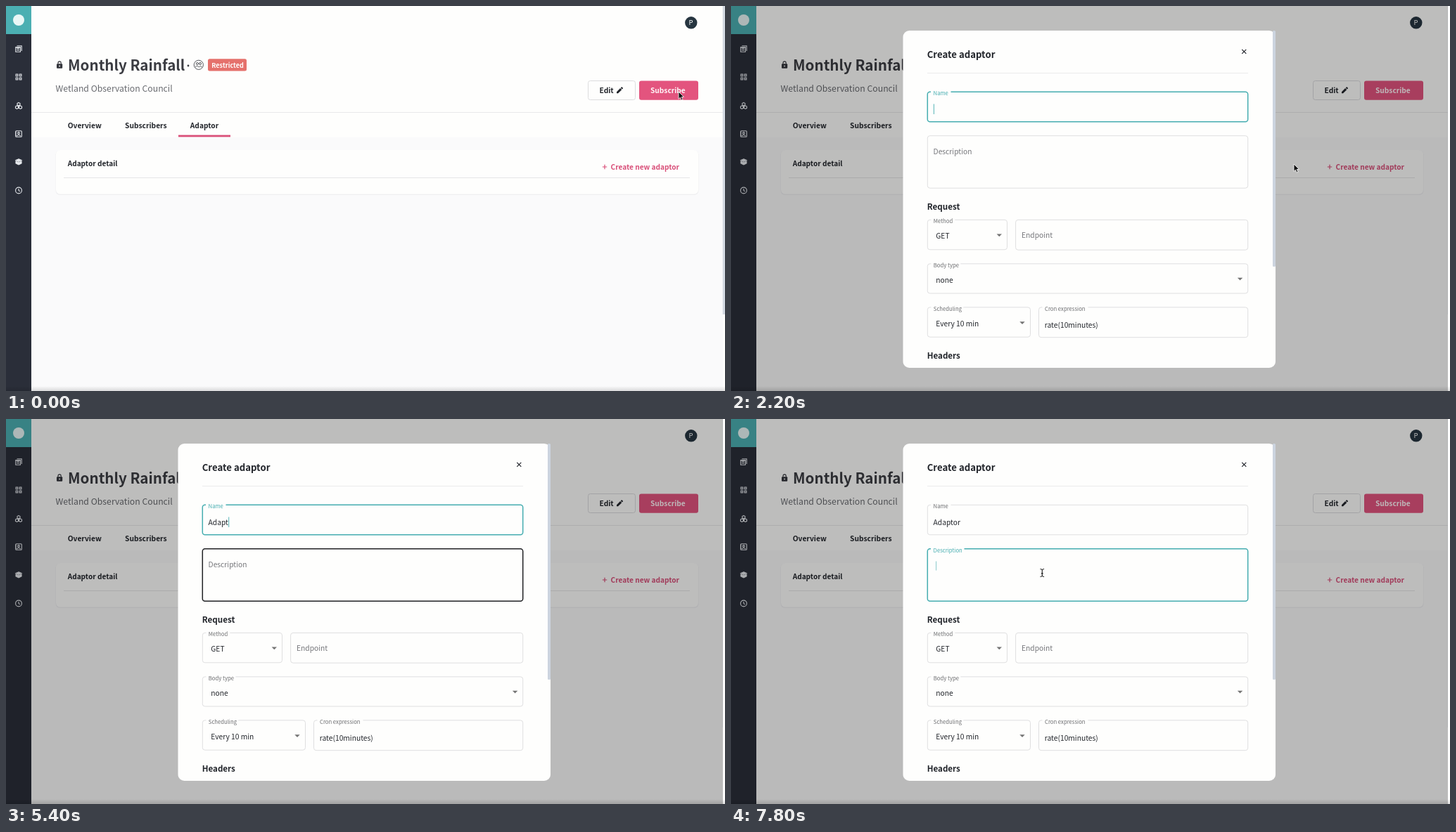
Recreate the animation shown at these times as an HTML page. Size 1022 by 548 pixels, loop 8 s.

```html
<!DOCTYPE html>
<html lang="en">
<head>
<meta charset="utf-8">
<title>Create adaptor</title>
<style>
  html, body { margin: 0; width: 100%; height: 100%; overflow: hidden; background: #fefefd; }
  svg { display: block; width: 1022px; height: 548px; }
  text { font-family: "Noto Sans CJK SC", "Noto Sans CJK JP", "Noto Sans CJK", "Noto Sans", sans-serif; white-space: pre; }
  .bold { font-weight: 700; }
</style>
</head>
<body>
<svg id="stage" viewBox="0 0 1022 548" xmlns="http://www.w3.org/2000/svg"></svg>
<script>
const LOOP = 8000, STEP = 200;
const INK = '#22252b', GREY = '#75767a', LINE = '#dfdfe0', TEAL = '#45adb0', PINK = '#d94f79';
const LABEL = 7.7, BODY = 10.25;

const text = (x, y, size, str, fill = INK, cls = '', id = '') =>
  `<text x="${x}" y="${y}" font-size="${size}" fill="${fill}" class="${cls}" id="${id}">${str}</text>`;
const bold = (x, y, size, str, fill = INK) => text(x, y, size, str, fill, 'bold');
const rect = (x, y, w, h, fill, extra = '') =>
  `<rect x="${x}" y="${y}" width="${w}" height="${h}" fill="${fill}" ${extra}/>`;
const path = (d, fill = 'none', stroke = 'none', width = 1, extra = '') =>
  `<path d="${d}" fill="${fill}" stroke="${stroke}" stroke-width="${width}" ${extra}/>`;
const group = (id, body) => `<g id="${id}">${body}</g>`;

const box = (x, y, right, bottom, id = '') =>
  rect(x, y, right - x, bottom - y, 'none', `rx="3.5" stroke="${LINE}" id="${id}"`);
const notch = (x, y, w, id = '') => rect(x, y - 2, w, 4, '#fefefd', `id="${id}"`);
const field = (x, y, right, bottom, label, labelWidth, value, baseline, inset) =>
  box(x, y, right, bottom) + notch(x + 5, y, labelWidth) +
  text(x + 8.5, y + 5, LABEL, label, '#6c6d70') + text(x + inset, baseline, BODY, value);
const caretDown = (x, y) => path(`M${x - 3.7} ${y - 1.8}h7.4l-3.7 3.7z`, '#747474');

function sidebar() {
  const icon = (y, body) => `<g transform="translate(18 ${y})" fill="none" stroke="#e6e9ed" stroke-width="1.1">${body}</g>`;
  const square = (x, y) => `<rect x="${x}" y="${y}" width="2.7" height="2.7"/>`;
  return rect(0, 0, 36, 548, '#2a2e39') + rect(0, 0, 36, 40, '#4bafb2') +
    '<circle cx="18" cy="20" r="8" fill="#e9f7f6"/>' +
    icon(61, '<path d="M-4.2-2.5h6.6v6.7h-6.6zM-2.5-4.2H4.2V3M-2.6-.6H.8M-2.6 1.6H.8M-4-2H2"/>') +
    icon(101, square(-3.9, -3.9) + square(1.2, -3.9) + square(-3.9, 1.2) + square(1.2, 1.2)) +
    icon(142, '<path d="M0-4.5l2 1.1v2.2L0 0l-2-1.2v-2.2zM-2.5 0l2 1.1v2.2l-2 1.1-2-1.1V1.1zM2.5 0l2 1.1v2.2l-2 1.1-2-1.1V1.1z"/>') +
    icon(182, '<rect x="-4.3" y="-4.2" width="8.6" height="8.4" rx="1"/><circle cy="-1.1" r="1.3"/><path d="M-2.7 3.2Q0-.2 2.7 3.2M-4.3-2.2h1.2M-4.3 0h1.2M-4.3 2.2h1.2"/>') +
    icon(222, '<path d="M0-4.2l4 1.8-4 1.8-4-1.8z" fill="#e6e9ed"/><path d="M-4-1v3L0 4l4-2v-3L0 1z" fill="#e6e9ed"/>') +
    icon(262.5, '<circle r="4.4"/><path d="M0-2.6V.2l2 1.2"/>');
}

function page() {
  return rect(0, 0, 1022, 548, '#fefefd') + rect(36, 187, 983, 361, '#fafafb') +
    sidebar() +
    '<circle cx="973.8" cy="23.8" r="8.7" fill="#263540"/>' + text(970.6, 27.4, 9.5, 'P', '#fff') +
    rect(72, 82.3, 8.2, 6.4, '#34363c', 'rx="1"') + path('M74 83v-2a2.1 2.1 0 0 1 4.2 0v2', 'none', '#34363c', 1.1) +
    '<circle cx="76.1" cy="85.5" r=".9" fill="#fff"/>' +
    bold(88, 91.6, 20.6, 'Monthly Rainfall', '#3b3c42') +
    '<circle cx="259" cy="85" r="1.4" fill="#3b3c42"/>' +
    `<g fill="none" stroke="#55575c"><circle cx="273.8" cy="83.8" r="6.6"/><circle cx="271.8" cy="82" r="1.5"/>
     <circle cx="276" cy="82" r="1.5"/><path d="M269 87q2.8-3.4 5.2 0q2-3 4.6 0"/></g>` +
    rect(287, 75.3, 55, 17.3, '#e5716c', 'rx="2.5"') + bold(292.3, 87.8, 9.05, 'Restricted', '#fff') +
    text(70.5, 121.7, 12.25, 'Wetland Observation Council', '#686a6f') +
    rect(827.5, 106.5, 67, 27, '#fefefd', 'rx="3" stroke="#dcdcde"') + bold(843.5, 123.8, 10.2, 'Edit') +
    path('M868 122.2l5.1-5.1 2.1 2.1-5.1 5.1h-2.1zM873.7 116.5l1-1q.5-.4 1 0l1.1 1.1q.4.5 0 1l-1 1z', INK) +
    rect(900, 106.5, 84, 27.3, '#e3547e', 'rx="3"') + bold(916, 123.8, 10.2, 'Subscribe', '#fff5f8') +
    rect(36, 151, 983, 1, '#e9e9ea') +
    bold(87.7, 173.7, 10.25, 'Overview') + bold(169, 173.7, 10.25, 'Subscribers') + bold(261.8, 173.7, 10.2, 'Adaptor') +
    rect(245, 183.6, 74, 2.8, PINK) +
    rect(70.5, 205.5, 914, 63.5, '#efeff1', 'rx="6"') + rect(71, 205, 913, 62.7, '#fefefd', 'rx="6"') +
    bold(87.7, 228.3, 10.1, 'Adaptor detail') + rect(82, 244, 890, 1, '#e6e6e7') +
    rect(830, 215.3, 142, 27, '#f7f3f4', 'rx="3" id="hover"') +
    '<clipPath id="button"><rect x="830" y="215.3" width="142" height="27" rx="3"/></clipPath>' +
    '<circle id="ripple" cx="926" cy="230" fill="#f1e5e9" clip-path="url(#button)"/>' +
    path('M847.8 229h6.4M851 225.8v6.4', 'none', PINK, 1.2) + bold(859.6, 232.7, 10.1, 'Create new adaptor', PINK) +
    rect(1018.7, 0, 3.3, 439, '#d3d9e2');
}

function modal() {
  return rect(0, 0, 1019, 548, '#000', 'opacity=".26"') + rect(1019, 0, 3, 548, '#fdfdfd') +
    rect(244.5, 35, 529.5, 480, '#fefefd', 'rx="9"') +
    rect(770, 35, 4, 336, '#ccd4df', 'rx="1.5" id="scroll"') +
    bold(278.7, 74.2, 13.2, 'Create adaptor') +
    path('M726.3 61.8l6 6M732.3 61.8l-6 6', 'none', INK, 1.2) +
    rect(279, 95, 456, 1, '#ebebec') +
    box(279.3, 122.3, 734.7, 164.8, 'nameBox') + notch(284, 122.3, 28.5) +
    text(0, 0, BODY, 'Name', GREY, '', 'nameLabel') +
    text(287.6, 150.8, BODY, '', INK, '', 'nameValue') +
    box(279.3, 184.7, 734.7, 259.2, 'noteBox') + notch(284, 184.7, 47.5, 'noteNotch') +
    text(0, 0, BODY, 'Description', GREY, '', 'noteLabel') +
    bold(278.7, 290.4, 11.65, 'Request') +
    field(279.3, 304.4, 392.5, 346.8, 'Method', 34, 'GET', 330.8, 12) + caretDown(381.3, 326.4) +
    box(404.6, 304.4, 734.7, 347.2) + text(413, 330.3, BODY, 'Endpoint', GREY) +
    field(279.3, 366.9, 734.7, 409, 'Body type', 42, 'none', 393.6, 12) + caretDown(723.6, 388.6) +
    field(279.3, 428.9, 425.5, 471.2, 'Scheduling', 46, 'Every 10 min', 455.6, 12) + caretDown(414, 451) +
    field(437.5, 428.9, 734.7, 471.7, 'Cron expression', 65, 'rate(10minutes)', 457.7, 8.3) +
    bold(278.7, 502.4, 11.6, 'Headers') +
    rect(0, 0, .9, 15, TEAL, 'id="caret"');
}

document.getElementById('stage').innerHTML =
  '<linearGradient id="fade" x2="0" y2="1"><stop stop-opacity="0"/><stop offset="1" stop-opacity=".13"/></linearGradient>' +
  page() + group('modal', modal()) + rect(0, 541, 1022, 7, 'url(#fade)') +
  group('arrow', path('M0 0v10.4l2.4-2.2 1.7 3.9 1.9-.8-1.7-3.8h3.3z', '#111', '#fff', .8)) +
  group('ibeam', path('M-2.8-5.5q2.3 0 2.8 1.4q.5-1.4 2.8-1.4M0-4.2v8.4M-2.8 5.5q2.3 0 2.8-1.4q.5 1.4 2.8 1.4M-1.4.9h2.8', 'none', '#1b1b1b', 1.1));

const el = {};
document.querySelectorAll('[id]').forEach(node => { el[node.id] = node; });
const set = (node, attrs) => { for (const k in attrs) node.setAttribute(k, attrs[k]); };
const show = (node, on) => set(node, { visibility: on ? 'visible' : 'hidden' });
const clamp = v => Math.max(0, Math.min(1, v));
const lerp = (a, b, p) => a + (b - a) * p;

// [time, x, y]
const POINTER = [[0, 956, 122], [200, 950, 147], [400, 936, 211], [600, 930, 236], [1000, 930, 236], [1400, 926, 230],
  [2000, 926, 230], [2200, 800, 225], [2400, 560, 218], [2600, 494.5, 217], [7000, 494.5, 217], [7400, 442.3, 219], [8000, 442.3, 219]];
const TYPED = [[0, 0], [3400, 1], [4000, 3], [4600, 4], [5400, 5], [6000, 6], [6800, 7]];
const CARET = [[0, 0], [1800, 1], [2600, 0], [2800, 1], [3200, 0], [3400, 1], [4200, 0], [4600, 1], [5000, 0],
  [5400, 1], [5600, 0], [6000, 1], [6400, 0], [6800, 1], [7200, 0], [7600, 1]];

const held = (keys, t) => keys.filter(k => k[0] <= t).pop()[1];
function pointerAt(t) {
  const i = POINTER.findIndex(k => k[0] > t);
  const a = POINTER[i - 1], b = POINTER[i], p = (t - a[0]) / (b[0] - a[0]);
  return [lerp(a[1], b[1], p), lerp(a[2], b[2], p)];
}
function floatLabel(node, baseline, top, p, color) {
  set(node, { x: 287.6, y: lerp(baseline, top, p), 'font-size': lerp(BODY, LABEL, p), fill: color });
}
function outline(node, color) {
  set(node, { stroke: color, 'stroke-width': color === LINE ? 1 : 1.5 });
}

function draw(t) {
  const open = t >= 1800, noteFocus = t >= 7600;
  const [px, py] = pointerAt(t);
  const overNote = open && px > 279 && px < 735 && py > 184 && py < 260;

  show(el.modal, open);
  show(el.hover, t >= 800 && t < 2200);
  show(el.ripple, t >= 1600 && t < 2000);
  set(el.ripple, { r: lerp(84, 110, clamp((t - 1600) / 200)) });
  set(el.scroll, { height: t < 2000 ? 317 : 336 });

  const nameFloat = clamp((t - 1800) / 200);
  const nameFocus = nameFloat > 0 && !noteFocus;
  floatLabel(el.nameLabel, 148.1, 127.2, nameFloat, nameFocus ? TEAL : nameFloat ? '#6c6d70' : GREY);
  outline(el.nameBox, nameFocus ? TEAL : LINE);
  el.nameValue.textContent = 'Adaptor'.slice(0, held(TYPED, t));

  const noteFloat = clamp((t - 7500) / 200);
  floatLabel(el.noteLabel, 210.8, 189.6, noteFloat, noteFocus ? TEAL : GREY);
  outline(el.noteBox, noteFocus ? TEAL : overNote ? '#202124' : LINE);
  show(el.noteNotch, open && noteFocus);

  show(el.caret, open && held(CARET, t));
  set(el.caret, noteFocus
    ? { x: 291.2, y: 202.5, height: 13, opacity: .7 }
    : { x: 287.6 + el.nameValue.getComputedTextLength() + .3, y: 139.5, height: 14.5, opacity: 1 });

  const visible = t < 3400 || t >= 7000;
  show(el.arrow, visible && !overNote);
  show(el.ibeam, visible && overNote);
  const place = { transform: `translate(${px} ${py})` };
  set(el.arrow, place);
  set(el.ibeam, place);
}

const start = performance.now();
function tick() {
  const t = (performance.now() - start) % LOOP;
  draw(Math.floor(t / STEP) * STEP);
  requestAnimationFrame(tick);
}
tick();
</script>
</body>
</html>
```
